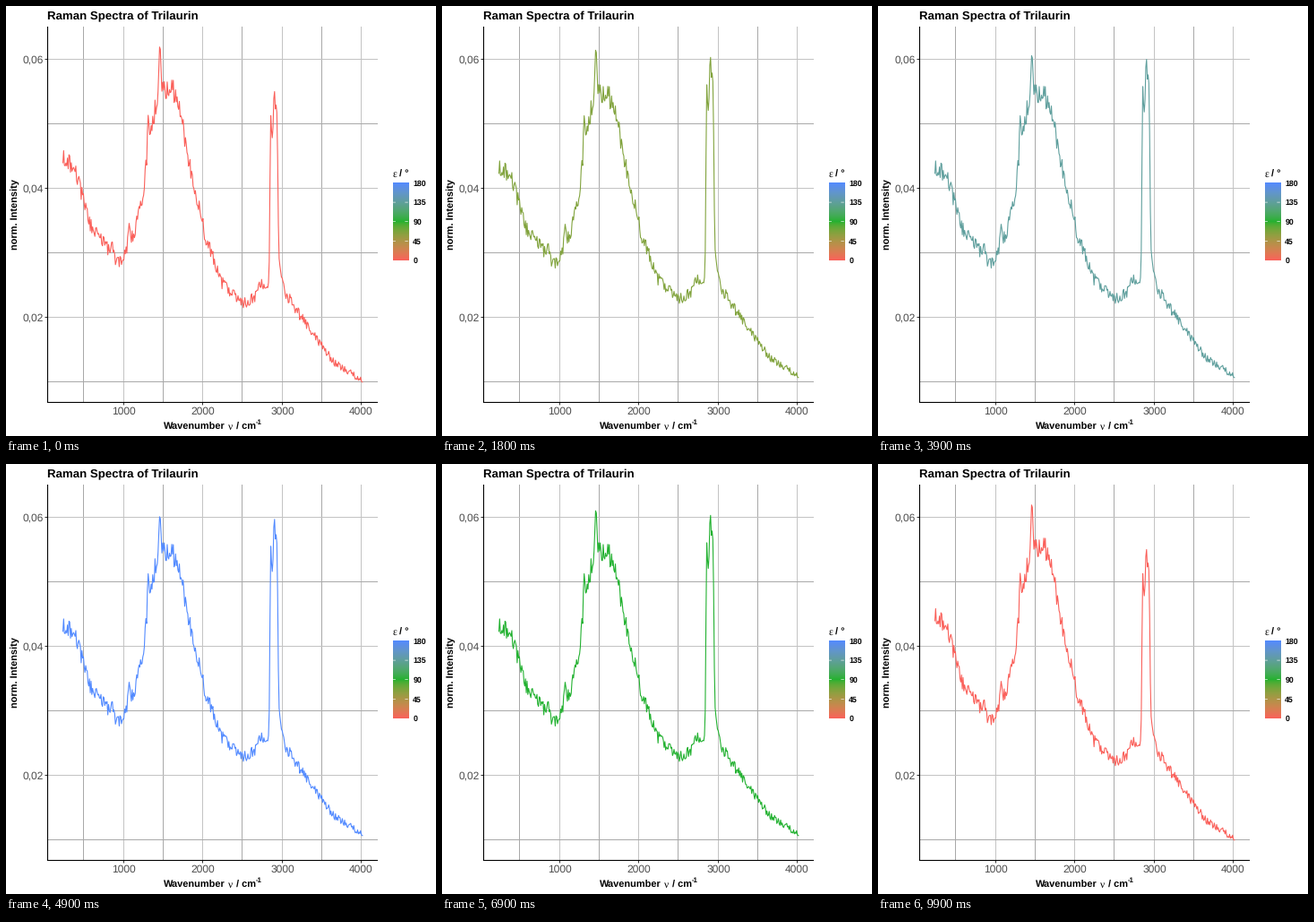
A matplotlib script that plays this animation: 480x480 px, repeating every 10 s.

```python
import numpy as np
import matplotlib.pyplot as plt
from matplotlib.animation import FuncAnimation

SIZE, DPI = 480, 96
PX = 72 / DPI
FRAMES, INTERVAL = 100, 100
HOLD, MOVE = 5, 10
ANGLES = [0, 65, 90, 180]
STOPS = np.array([[250, 96, 90], [34, 177, 48], [82, 138, 255]]) / 255

TO_XYZ = np.array([[0.4124, 0.3576, 0.1805],
                   [0.2126, 0.7152, 0.0722],
                   [0.0193, 0.1192, 0.9505]])
WHITE = TO_XYZ.sum(axis=1)

plt.rcParams["text.hinting"] = "none"


def rgb_to_lab(rgb):
    lin = np.where(rgb > 0.04045, ((rgb + 0.055) / 1.055) ** 2.4, rgb / 12.92)
    t = lin @ TO_XYZ.T / WHITE
    f = np.where(t > 0.008856, np.cbrt(t), 7.787 * t + 16 / 116)
    x, y, z = f.T
    return np.stack([116 * y - 16, 500 * (x - y), 200 * (y - z)], axis=-1)


def lab_to_rgb(lab):
    l, a, b = np.moveaxis(lab, -1, 0)
    y = (l + 16) / 116
    f = np.stack([y + a / 500, y, y - b / 200], axis=-1)
    t = np.where(f > 0.2069, f ** 3, (f - 16 / 116) / 7.787)
    lin = np.clip((t * WHITE) @ np.linalg.inv(TO_XYZ).T, 0, 1)
    rgb = np.where(lin > 0.0031308, 1.055 * lin ** (1 / 2.4) - 0.055, 12.92 * lin)
    return np.clip(rgb, 0, 1)


LAB = rgb_to_lab(STOPS)


def angle_lab(angle):
    return np.stack([np.interp(angle, [0, 90, 180], c) for c in LAB.T], axis=-1)


# Spectrum in pixels: height above the zero line over horizontal position
ZERO = 492
X = np.arange(63.5, 398.6, 0.85)
BACKGROUND = [(63, 322), (75, 315), (95, 246), (126, 204), (143, 238),
              (152, 277), (160, 343), (170, 396), (185, 402), (194, 375),
              (208, 300), (222, 237), (240, 184), (264, 160), (290, 172),
              (308, 178), (330, 144), (366, 94), (398, 74)]
# Sharp lines: centre, width, height
LINES = [(118.6, 1.2, 16), (137.5, 1.5, 18), (158.6, 1.2, 32),
         (197.7, 1, 20), (284, 4, 12)]


def bump(center, width, power=2):
    return np.exp(-np.abs((X - center) / width) ** power)


def build_spectra():
    rng = np.random.default_rng(12)
    background = np.interp(X, *zip(*BACKGROUND))
    lines = sum(h * bump(c, w) for c, w, h in LINES)
    bend = bump(171.8, 1.6)
    stretch = (135 * bump(299, 4.8, 8) + 60 * bump(301, 5) + 52 * bump(295.5, 0.9)
               + 36 * bump(299.4, 0.9) + 16 * bump(302, 0.9))
    noise = rng.uniform(-1, 1, X.size) * (2 + background / 38)
    noise *= np.exp(-(stretch + 50 * bend) / 20)
    base = background + lines + noise
    drift = (5 / (1 + np.exp((225 - X) / 10)) - 12 * np.exp((63 - X) / 30)
             - 7 * bump(187, 12))

    def spectrum(turned, bend_height, gain):
        return ZERO - (base + turned * drift + bend_height * bend + gain * stretch)

    return [spectrum(0, 51, 1), spectrum(1, 49, 1.15),
            spectrum(1, 46, 1.15), spectrum(1, 39, 1.13)]


SPECTRA = build_spectra()
COLORS = [angle_lab(a) for a in ANGLES]

fig = plt.figure(figsize=(SIZE / DPI, SIZE / DPI), dpi=DPI, facecolor="white")
ax = fig.add_axes([0, 0, 1, 1])
ax.axis("off")


def segment(x0, y0, x1, y1, color, width=1.0, z=1):
    ax.plot([x0, x1], [y0, y1], color=color, lw=width * PX, zorder=z,
            solid_capstyle="butt", snap=False)


def label(x, y, text, size, color="black", weight="bold", ha="left",
          font="Liberation Sans", rotation=0):
    ax.text(x, y, text, fontsize=size * PX, color=color, weight=weight, ha=ha,
            va="baseline", family=font, rotation=rotation,
            rotation_mode="anchor")


def greek(x, y, text):
    label(x, y, text, 11.5, weight="normal", font="Liberation Serif")


LEFT, RIGHT, TOP, BOTTOM = 46.5, 415, 23, 442.5
MAJOR, MINOR, TICK, TICK_TEXT = "#c3c3c3", "#a9a9a9", "#333333", "#4d4d4d"

for k in range(1, 9):
    x = int(42.7 + 44.25 * k) + 0.5
    segment(x, TOP, x, BOTTOM, MINOR if k % 2 else MAJOR)
    if k % 2 == 0:
        segment(x, BOTTOM, x, BOTTOM + 3, TICK)
        label(x, 456, str(k * 500), 12, TICK_TEXT, "normal", "center")
for k in range(6):
    y = int(59.3 + 72.1 * k) + 0.5
    segment(LEFT, y, RIGHT, y, MINOR if k % 2 else MAJOR)
    if k % 2 == 0:
        segment(LEFT - 3, y, LEFT, y, TICK)
        label(41.8, y + 4.3, f"0,0{6 - k}", 12, TICK_TEXT, "normal", "right")
segment(LEFT, TOP, LEFT, BOTTOM + 0.5, "black", 1.1, 4)
segment(LEFT - 0.5, BOTTOM, RIGHT, BOTTOM, "black", 1.1, 4)

label(46.5, 15, "Raman Spectra of Trilaurin", 13.2)
label(13.7, 272.5, "norm. Intensity", 11, rotation=90)
label(176, 473, "Wavenumber", 11)
greek(248, 473, "ν")
label(256.8, 473, "/ cm", 11)
label(278.8, 467, "-1", 7.7)

# Colour bar
greek(431.3, 191, "ε")
label(439.3, 191, "/ °", 11)
BAR = (431.5, 448.8, 283.9, 197.5)
ramp = lab_to_rgb(angle_lab(np.linspace(180, 0, 300)))
ax.imshow(ramp[:, None, :], extent=BAR, aspect="auto",
          interpolation="bilinear", zorder=2)
ax.set(xlim=(0, SIZE), ylim=(SIZE, 0))
for k in range(5):
    y = BAR[2] - k * (BAR[2] - BAR[3]) / 4
    if 0 < k < 4:
        segment(BAR[0], y, BAR[0] + 3.4, y, "white", 0.6, 3)
        segment(BAR[1] - 3.4, y, BAR[1], y, "white", 0.6, 3)
    label(454.3, y + 3.2, str(45 * k), 8.8)

curve, = ax.plot([], [], lw=1.1 * PX, zorder=3, solid_joinstyle="round",
                 solid_capstyle="butt")


def update(frame):
    # Forward through the states, then mirrored back
    step = min(frame, FRAMES - 1 - frame)
    state, part = divmod(step + 1, HOLD + MOVE)
    t = max(0, part - HOLD) / MOVE
    following = min(state + 1, len(SPECTRA) - 1)

    def blend(states):
        return (1 - t) * states[state] + t * states[following]

    curve.set_data(X, blend(SPECTRA))
    curve.set_color(tuple(lab_to_rgb(blend(COLORS))))
    return curve,


anim = FuncAnimation(fig, update, frames=FRAMES, interval=INTERVAL,
                     repeat=True, repeat_delay=0, blit=False)
plt.show()
```
